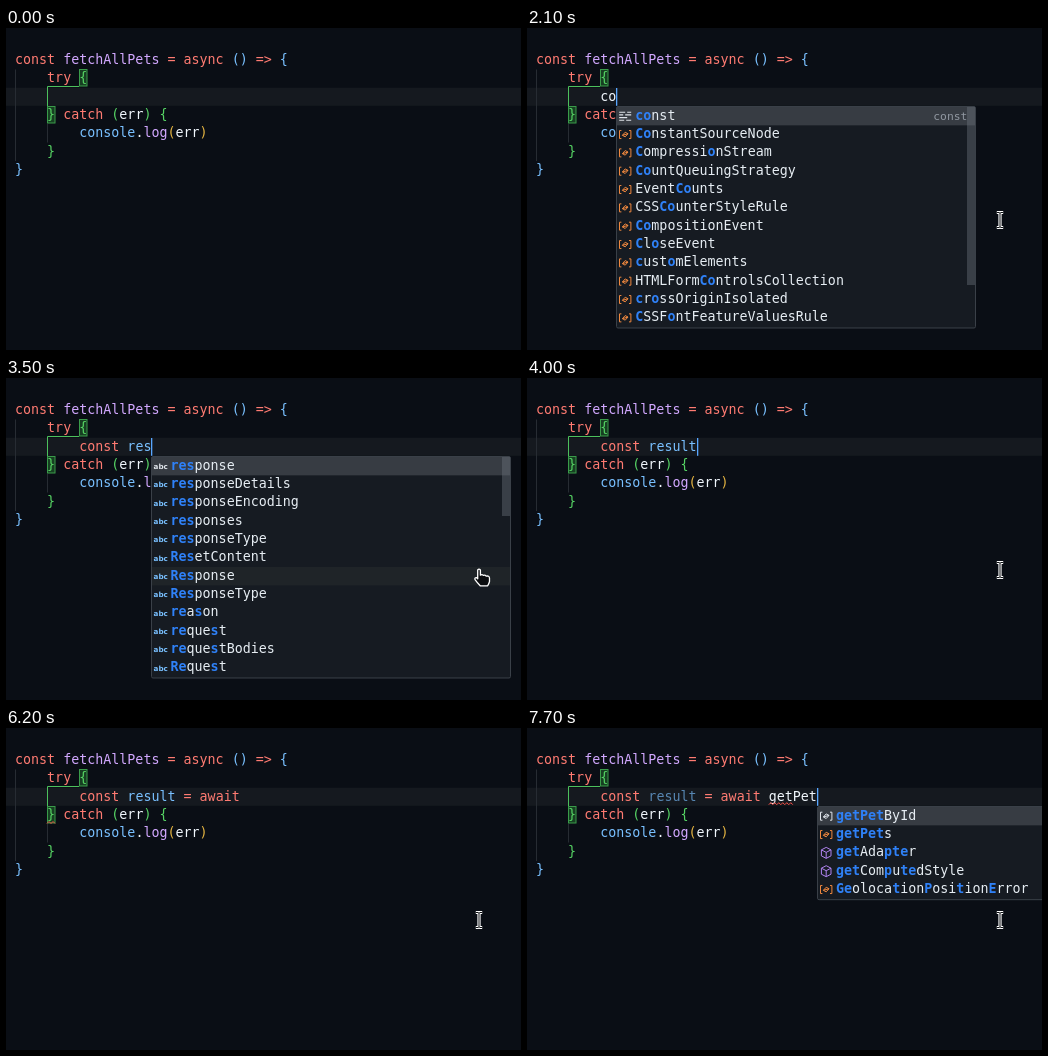
These frames come from a looping animation (515x322 px, 8 s). An HTML page:

```html
<!DOCTYPE html>
<html lang="en">
<head>
<meta charset="utf-8">
<title>Typing in a code editor</title>
<style>
  html, body { margin: 0; width: 100%; height: 100%; overflow: hidden; background: #0a0e15; }
  svg { display: block; width: 515px; height: 322px; }
  text { font: 13.333px "DejaVu Sans Mono", monospace; white-space: pre; }
  .hit { font-weight: bold; fill: #2f81f7; }
  .detail { font-size: 11.33px; fill: #9198a1; }
  .abc { font: bold 7.2px "DejaVu Sans", sans-serif; }
</style>
</head>
<body>
<svg viewBox="0 0 515 322">
  <rect width="515" height="322" fill="#0a0e15"/>
  <g id="code"></g>
  <g id="typed"></g>
  <g id="popup"></g>
  <g id="mouse"></g>
</svg>
<script>
const LOOP = 8000, STEP = 100;
const LEFT = 9, CHAR = 8.027, LINE = 18.333, TOP = 22.9, BASE = 13;
const POPUP_TOP = 79, POPUP_WIDTH = 360, MAX_ROWS = 12;
const C = {
  key: '#ff7b72', fn: '#d2a8ff', id: '#79c0ff', text: '#f0f6fc',
  b1: '#79c0ff', b2: '#56d364', b3: '#e3b341', error: '#f85149',
  orange: '#f0883e', purple: '#b083f0'
};
const layer = id => document.getElementById(id);
const col = n => LEFT + n * CHAR;
const lineTop = n => TOP + (n - 1) * LINE;
const span = (s, fill, extra = '') => `<tspan fill="${fill}" ${extra}>${s.replace(/>/g, '&gt;')}</tspan>`;
const rect = (x, y, w, h, fill, extra = '') =>
  `<rect x="${x}" y="${y}" width="${w}" height="${h}" fill="${fill}" ${extra}/>`;
const path = (d, stroke, width = 1, extra = '') =>
  `<path d="${d}" fill="none" stroke="${stroke}" stroke-width="${width}" ${extra}/>`;

function codeLine(n, indent, ...parts) {
  const body = parts.map(([s, kind]) => span(s, C[kind])).join('');
  return `<text x="${col(indent)}" y="${lineTop(n) + BASE}">${body}</text>`;
}

function squiggle(from, to, y) {
  let d = `M${from} ${y + 2}`;
  for (let x = from + 2, up = true; x <= to; x += 2, up = !up) d += `L${x} ${up ? y : y + 2}`;
  return path(d, C.error);
}

const bracketBox = (x, y) => rect(x, y, 7.5, 16.5, '#173f22', 'stroke="#3a9c4a"');

layer('code').innerHTML =
  rect(0, 59.8, 515, 18, '#15191f') +
  path('M9.5 41.5V133M41.5 96V114.5', '#272c33') +
  bracketBox(73.5, 41.5) + bracketBox(41.5, 78.5) +
  path('M73 58.5H41.5V78', '#4cc05c') +
  codeLine(1, 0, ['const', 'key'], [' fetchAllPets', 'fn'], [' = async', 'key'], [' ()', 'b1'], [' =>', 'key'], [' {', 'b1']) +
  codeLine(2, 4, ['try', 'key'], [' {', 'b2']) +
  codeLine(4, 4, ['}', 'b2'], [' catch', 'key'], [' (', 'b2'], ['err', 'text'], [') {', 'b2']) +
  codeLine(5, 8, ['console', 'id'], ['.', 'text'], ['log', 'fn'], ['(', 'b3'], ['err', 'text'], [')', 'b3']) +
  codeLine(6, 4, ['}', 'b2']) +
  codeLine(7, 0, ['}', 'b1']);

// Key press times, one per character.
const PHRASE = 'const result = await getPet';
const KEYS = [
  1900, 2100, 2200, 2400, 2500, 2900, 3100, 3200, 3300, 3600, 3800, 3900, 4100, 4300,
  4800, 5000, 5100, 5300, 5400, 5500, 5700, 6400, 6500, 6700, 7300, 7600, 7700
];
const CARET_OFF = [[0, 300], [800, 1300], [6200, 6400]];
const BRACE_ERROR = 4500, CHECKED = 7100;

// Each row is "icon label | detail | detail offset"; brackets mark the matched letters.
const LISTS = {
  c: { bar: 178, rows: [
    'key [const]|const|317', 'var [Const]antSourceNode', 'var [C]ompressi[onSt]ream',
    'var [Co]u[n]tQueuing[St]rategy', 'var Event[Co]u[nts]', 'var CSS[Co]u[n]ter[St]yleRule',
    'var [Co]mpo[s]itionEve[nt]', 'var [C]l[os]eEve[nt]', 'var [c]ust[o]mEleme[nts]',
    'var HTMLForm[Cont]rol[s]Collection', 'var [c]r[o]ssOrigi[n]I[s]ola[t]ed',
    'var [C]SSF[ont]FeatureValue[s]Rule'] },
  r: { bar: 59, rows: [
    'abc [res]ponse', 'abc [res]ponseDetails', 'abc [res]ponseEncoding', 'abc [res]ponses',
    'abc [res]ponseType', 'abc [Res]etContent', 'abc [Res]ponse', 'abc [Res]ponseType',
    'abc [re]a[s]on', 'abc [re]que[s]t', 'abc [re]que[s]tBodies', 'abc [Re]que[s]t'] },
  a: { bar: 60, rows: [
    'snip [a]sync arrow function|Async Function Expres…|198', 'fun [a]ddEventListener', 'fun [a]lert',
    'key [a]s', 'key [a]sync', 'fun [a]tob', 'key [await]', 'fun [a]ll', 'var [a]veto',
    'snip [a]sync function|Async Function Statement|187', 'var [A]bortController', 'var [A]bortSignal'] },
  g: { bar: 90, rows: [
    'var [getPet]ById', 'var [getPet]s', 'fun [get]Ada[pte]r', 'fun [get]Com[p]u[te]dStyle',
    'fun [get]Selection', 'var [Ge]oloca[t]ion', 'var [Ge]oloca[t]ionCoordinates',
    'var [Ge]oloca[t]ionPosition', 'var [Ge]oloca[t]ion[P]osi[t]ion[E]rror',
    'var [G]amepad[E]ven[t]', 'var Messa[ge]Even[t]', 'var Stora[ge]Even[t]'] }
};

function parseRow(row) {
  const [main, detail, dx] = row.split('|');
  const gap = main.indexOf(' ');
  const letters = [];
  let marked = false;
  for (const ch of main.slice(gap + 1)) {
    if (ch === '[' || ch === ']') marked = ch === '[';
    else letters.push({ ch, marked });
  }
  return { icon: main.slice(0, gap), letters, detail, dx: +dx, hits: letters.filter(l => l.marked).length };
}
for (const list of Object.values(LISTS)) list.rows = list.rows.map(parseRow);

function labelSpans(letters, limit) {
  let out = '', run = '', runHit = false, used = 0;
  const flush = () => { if (run) out += runHit ? `<tspan class="hit">${run}</tspan>` : run; run = ''; };
  for (const { ch, marked } of letters) {
    const hit = marked && used++ < limit;
    if (hit !== runHit) { flush(); runHit = hit; }
    run += ch;
  }
  flush();
  return out;
}

// Icons are drawn around their own centre.
const ICONS = {
  key: c => path('M-6 -4H0M2 -4H6M-6 -1.3H-2M0 -1.3H6M-6 1.4H2M-6 4.1H-1M1 4.1H6', c || C.key, 1.1),
  var: c => path('M-3.8 -4H-5.7V4H-3.8M3.8 -4H5.7V4H3.8', c || C.orange) +
    path('M-2.8 0.8L0 -2.3L2.8 -0.8L0 2.3ZM-2.8 .8L2.8 -.8', c || C.orange),
  fun: c => path('M0 -5.5L4.8 -3V3L0 5.5L-4.8 3V-3ZM-4.8 -3L0 -.5L4.8 -3M0 -.5V5.5', c || C.purple),
  snip: c => path('M-5 -5H5V5H-5Z', c || '#39a9b8', 1.1, 'stroke-dasharray="1.6 .9"'),
  abc: c => `<text class="abc" x="-6.6" y="2.8" fill="${c || '#79c0ff'}">abc</text>`
};

function popupFor(word, column) {
  const list = LISTS[word[0]];
  const rows = list ? list.rows.filter(r => r.hits >= word.length).slice(0, MAX_ROWS) : [];
  if (!rows.length) return null;
  return { x: col(column), rows, bar: list.bar, limit: word.length, height: rows.length * LINE };
}

function drawPopup(p, hoverRow) {
  const x = Math.round(p.x);
  let out = rect(x + .5, POPUP_TOP - .5, POPUP_WIDTH - 1, p.height + 1.5, '#161b22', 'rx="1.5" stroke="#3a4048"');
  p.rows.forEach((row, i) => {
    const y = POPUP_TOP + i * LINE;
    if (i === 0) out += rect(x + 1, y, POPUP_WIDTH - 2, LINE, '#373c43');
    else if (i === hoverRow) out += rect(x + 1, y, POPUP_WIDTH - 2, LINE, '#1f2428');
    out += `<g transform="translate(${x + 9.2} ${y + 9.2})">${ICONS[row.icon](i ? '' : '#dfe4ea')}</g>`;
    out += `<text x="${p.x + 19}" y="${y + BASE - .2}" fill="#e6edf3">${labelSpans(row.letters, p.limit)}</text>`;
    if (row.detail) out += `<text class="detail" x="${p.x + row.dx}" y="${y + BASE}">${row.detail}</text>`;
  });
  if (p.rows.length === MAX_ROWS) out += rect(x + POPUP_WIDTH - 9, POPUP_TOP, 8, p.bar, '#6e7681', 'opacity=".4"');
  return out;
}

function typedSpans(text, t) {
  const words = text.split(' ');
  const keyword = (w, full) => w === full ? C.key : C.text;
  return words.map((w, i) => {
    const fill = [keyword(w, 'const'), C.id, C.key, keyword(w, 'await'), C.text][i];
    const faded = i === 1 && t >= CHECKED ? 'fill-opacity=".66"' : '';
    return span((i ? ' ' : '') + w, fill, faded);
  }).join('');
}

function mouseAt(t) {
  const stops = [[100, 20, 34], [600, 268, 175], [800, 268, 175], [1000, 473, 192]];
  if (t >= 1000) return { x: 473, y: 192 };
  const i = stops.findIndex(s => s[0] > t) - 1;
  const [a, b] = [stops[i], stops[i + 1]];
  const k = (t - a[0]) / (b[0] - a[0]), e = k * k * (3 - 2 * k);
  return { x: a[1] + (b[1] - a[1]) * e, y: a[2] + (b[2] - a[2]) * e };
}

const BEAM = 'M-3.2 -7.5H-1L0 -6.8L1 -7.5H3.2M0 -6.8V6.8M-3.2 7.5H-1L0 6.8L1 7.5H3.2';
const HAND = 'M-1.3 0Q0 -1.8 1.4 0V5.2Q3 4 4.4 5.4Q6 4.6 7.2 6.1Q10.3 5.5 10.5 8V11.5Q10 13.5 8.7 15.8H1.2' +
  'Q-1.5 13 -4 9.6Q-4.6 7.5 -2.6 7.6L-1.3 8.8Z';

function drawMouse({ x, y }, hand) {
  const shape = hand
    ? `<path d="${HAND}" fill="#0b0d10" stroke="#fff" stroke-width="1.3" stroke-linejoin="round"/>`
    : path(BEAM, '#fff', 3.2) + path(BEAM, '#0b0d10', 1);
  return `<g transform="translate(${x} ${y})">${shape}</g>`;
}

function render(t) {
  const count = KEYS.filter(k => k <= t).length;
  const text = PHRASE.slice(0, count);
  const caretOn = !CARET_OFF.some(([a, b]) => t >= a && t < b);
  let line = `<text x="${col(8)}" y="${lineTop(3) + BASE}">${typedSpans(text, t)}</text>`;
  if (t >= BRACE_ERROR && t < CHECKED) line += squiggle(41, 49, 93.5);
  if (t >= CHECKED) line += squiggle(col(29), col(32), 74.7);
  if (caretOn) line += rect(Math.round(col(8 + count)), 60, 1.3, 17.8, count ? '#58a6ff' : '#4cc05c');
  layer('typed').innerHTML = line;

  const popup = popupFor(text.split(' ').pop(), 8 + count);
  const mouse = t >= 100 ? mouseAt(t) : null;
  const over = popup && mouse && mouse.x > popup.x && mouse.x < popup.x + POPUP_WIDTH - 2 &&
    mouse.y < POPUP_TOP + popup.height;
  const hoverRow = over ? Math.floor((mouse.y - POPUP_TOP) / LINE) : -1;
  layer('popup').innerHTML = popup ? drawPopup(popup, hoverRow) : '';
  layer('mouse').innerHTML = mouse ? drawMouse(mouse, over) : '';
}

const start = performance.now();
let shown = -1;
function tick() {
  const t = Math.floor(((performance.now() - start) % LOOP) / STEP) * STEP;
  if (t !== shown) render(shown = t);
  requestAnimationFrame(tick);
}
tick();
</script>
</body>
</html>
```
